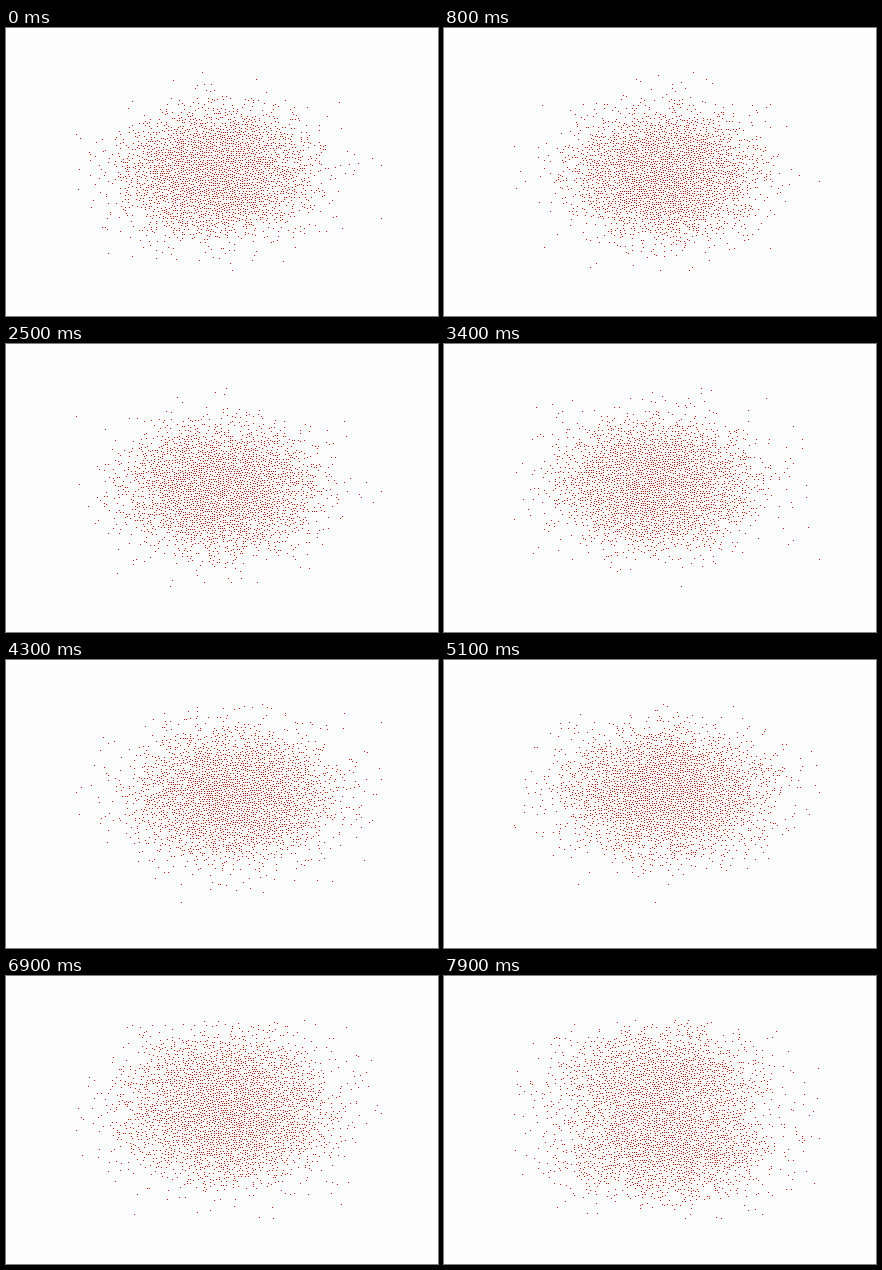
A matplotlib script that plays this animation: 432x288 px, repeating every 8 s.

```python
import numpy as np
import matplotlib.pyplot as plt
from matplotlib.animation import FuncAnimation

W, H, DPI = 432, 288, 100
STEP, FRAMES = 100, 80
LEFT, TOP, RIGHT, BOTTOM = 69, 44, 374, 242
SAMPLES = 6500


def wave(t, period, delay=0):
    return np.cos(2 * np.pi * (t - delay) / period)


def smoothstep(t, start, end):
    u = np.clip((t - start) / (end - start), 0, 1)
    return u * u * (3 - 2 * u)


def scatter(t, rng):
    """A drifting Gaussian cloud that slowly parts into two lobes."""
    split = smoothstep(t, 4800, 8200)
    cx = 218 - 9 * (1 - split) * wave(t, 3000)
    cy = 139 + 8 * wave(t, 9400, 1200)
    sx = 41 + 5 * smoothstep(t, 0, 8000)
    sy = 28 - 4 * split
    lobe = rng.choice([-1, 1], SAMPLES) * 32 * split
    x = rng.normal(cx, sx, SAMPLES) + lobe * 0.1
    y = rng.normal(cy, sy, SAMPLES) + lobe

    # One dot rests on each side of the box
    top, bottom = rng.normal(cx, sx, 2)
    left, right = rng.normal(cy, sy, 2)
    x = np.r_[top, bottom, LEFT, RIGHT, x]
    y = np.r_[TOP, BOTTOM, left, right, y]
    x, y = np.rint(x).astype(int), np.rint(y).astype(int)
    inside = (x >= LEFT) & (x <= RIGHT) & (y >= TOP) & (y <= BOTTOM)
    return x[inside].tolist(), y[inside].tolist()


def cloud(n):
    step = max(n, 1)              # the first picture is held twice
    t = step * STEP if n > 1 else 0
    rng = np.random.default_rng(500 + step)

    # Neighbouring dots never touch
    taken = np.zeros((H, W), bool)
    dots = []
    for x, y in zip(*scatter(t, rng)):
        if not taken[y, x]:
            taken[y - 1:y + 2, x - 1:x + 2] = True
            dots.append((x + 0.5, y + 0.5))
    return np.array(dots).T


fig = plt.figure(figsize=(W / DPI, H / DPI), dpi=DPI, facecolor="#fefdfd")
ax = fig.add_axes([0, 0, 1, 1])
ax.set_xlim(0, W)
ax.set_ylim(H, 0)
ax.axis("off")
points, = ax.plot([], [], ",", color="#ff0000")


def draw(n):
    points.set_data(*cloud(n))
    return points,


anim = FuncAnimation(fig, draw, frames=FRAMES, interval=STEP,
                     init_func=lambda: draw(0), repeat=True, repeat_delay=0)
plt.show()
```
